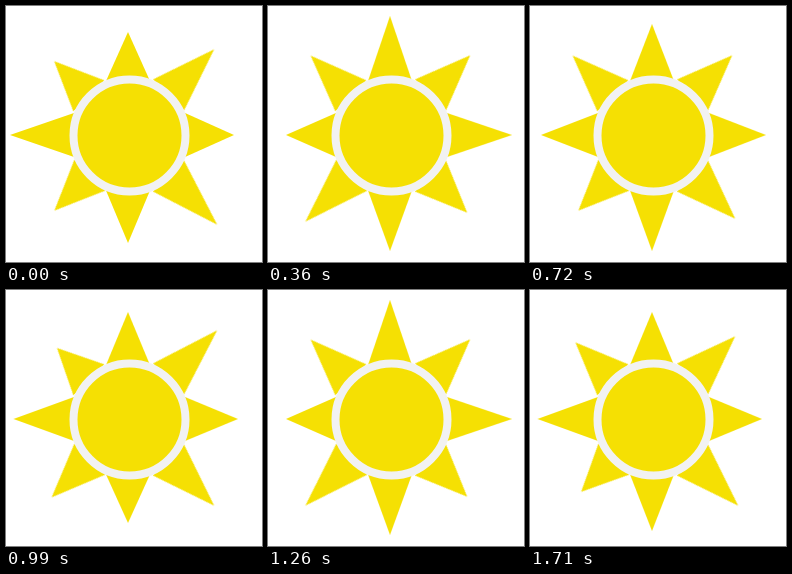
An HTML page for the animation above (1.8 s loop, 256x256 px).

```html
<!DOCTYPE html>
<html lang="en">
<head>
<meta charset="utf-8">
<title>Sun</title>
<style>
  html, body { margin: 0; width: 100%; height: 100%; overflow: hidden; background: #fff; }
  svg { display: block; width: 100%; height: 100%; }
  .ray { fill: #f5e003; animation: pulse 900ms infinite; animation-timing-function: steps(5, end); }
  .late { animation-delay: -810ms; }
  .early { animation-delay: -90ms; }

  /* Each ray stretches away from its base in five even steps, then returns. */
  @keyframes pulse {
    0%, 100% { transform: scaleY(var(--from)); }
    50% { transform: scaleY(var(--to)); }
  }
</style>
</head>
<body>
<svg viewBox="0 0 256 256">
  <defs><path id="spike" d="M-22 0L0-100 22 0z"/></defs>
  <g transform="translate(122 75)"><use href="#spike" class="ray" style="--from:.49;--to:.69"/></g>
  <g transform="translate(162.5 89) rotate(45)"><use href="#spike" class="ray late" style="--from:.689;--to:.477"/></g>
  <g transform="translate(179 129) rotate(90)"><use href="#spike" class="ray" style="--from:.49;--to:.69"/></g>
  <g transform="translate(162.5 170) rotate(135)"><use href="#spike" class="ray" style="--from:.689;--to:.477"/></g>
  <g transform="translate(122 184.5) rotate(180)"><use href="#spike" class="ray late" style="--from:.485;--to:.685"/></g>
  <g transform="translate(84 169) rotate(225)"><use href="#spike" class="ray early" style="--from:.465;--to:.66"/></g>
  <g transform="translate(68 129) rotate(270)"><use href="#spike" class="ray" style="--from:.64;--to:.465"/></g>
  <g transform="translate(83 90) rotate(315)"><use href="#spike" class="ray late" style="--from:.453;--to:.651"/></g>
  <circle cx="123.5" cy="129.5" r="56" fill="#f5e003" stroke="#f2f2f2" stroke-width="8"/>
</svg>
</body>
</html>
```
